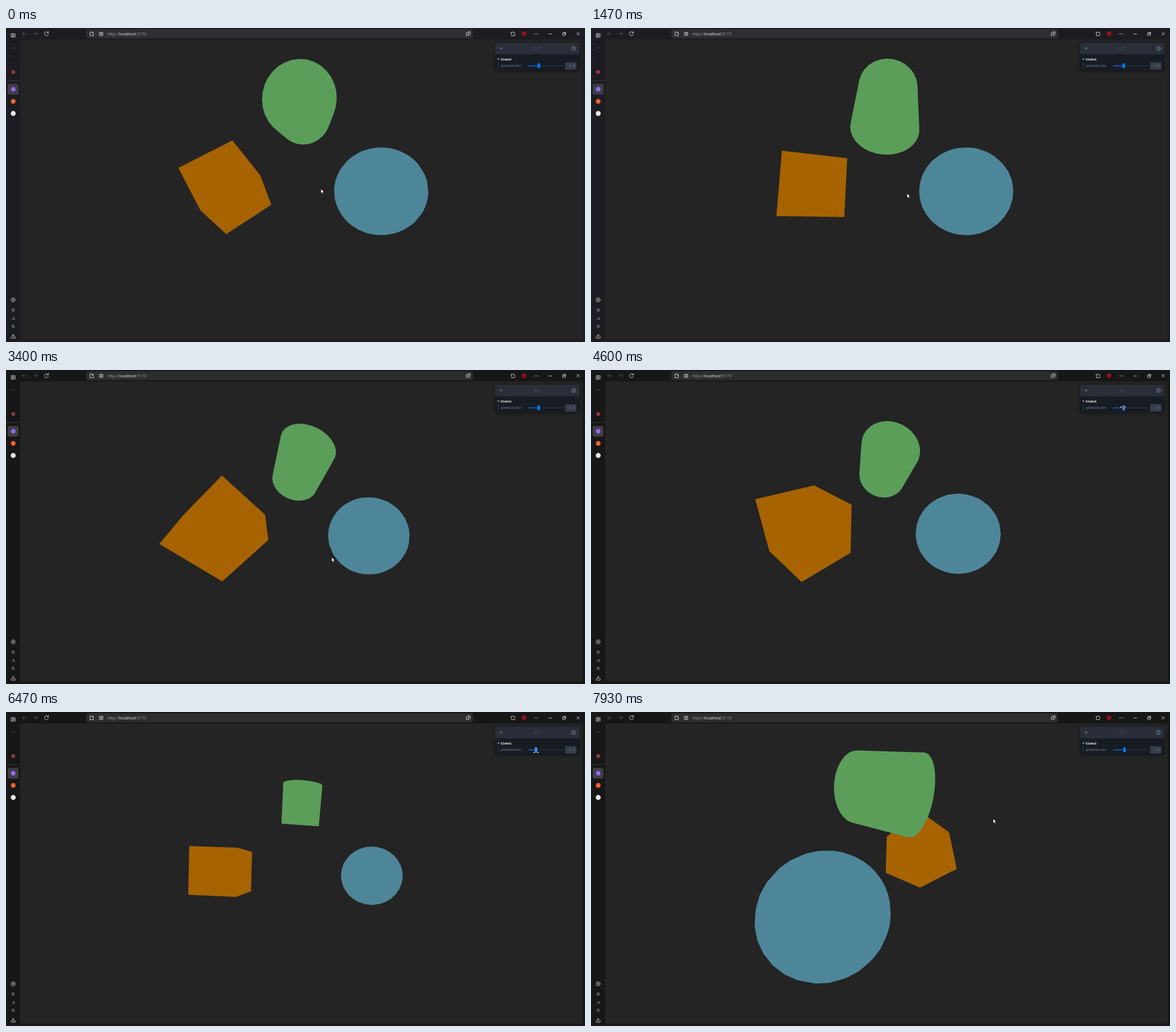
These frames come from a looping animation (1017x551 px, 8000 ms). An HTML page:

```html
<!DOCTYPE html>
<html lang="en">
<head>
<meta charset="utf-8">
<title>Rotating solids</title>
<style>
  html, body { margin: 0; width: 100%; height: 100%; overflow: hidden; background: #181818; }
  svg { display: block; width: 1017px; height: 551px; }
  .line { fill: none; stroke: #d6d6da; stroke-width: .9; stroke-linecap: round; stroke-linejoin: round; }
  .dim { stroke: #5b5b60; }
  .soft { stroke: #96969a; stroke-width: .8; }
  .url { font: 7.1px "Open Sans", "Noto Sans", sans-serif; fill: #a2a2a6; }
  .url tspan { fill: #f2f2f4; }
  .mono { font: 5.3px "Noto Sans Mono", "DejaVu Sans Mono", monospace; fill: #8c92a3; }
  .title { fill: #fefefe; font-weight: 600; }
</style>
</head>
<body>
<svg viewBox="0 0 1017 551">
  <defs>
    <filter id="shadow" x="-10%" y="-20%" width="120%" height="150%">
      <feDropShadow dx="0" dy="1" stdDeviation="3" flood-color="#000" flood-opacity=".45"/>
    </filter>
  </defs>
  <rect id="frame" width="1017" height="551"/>
  <rect x="25" y="20" width="988" height="527" rx="3" fill="#242424"/>
  <g id="scene"></g>

  <!-- toolbar -->
  <rect id="bar" x="141" y="2" width="679" height="16" rx="3"/>
  <path class="line dim" d="M36 10h-7m3-3l-3 3l3 3M48.500 10h7m-3-3l3 3l-3 3"/>
  <path class="line" d="M74 8a3.500 3.500 0 1 0 .5 3M74.500 6v2.500h-2.500"/>
  <path class="line" d="M148 7h3.500l2 2v4.500h-5.500zM151.500 7v2h2"/>
  <path class="line" d="M164.500 7.500h5.500v5.500h-5.500zM166 9.200h2.500M166 11.200h2.500"/>
  <text class="url" x="178" y="13">http://<tspan>localhost</tspan>:5173</text>
  <path class="line" d="M809 8.500h4v5l-2-1.500l-2 1.500zM811 6.700h4.200v5"/>
  <path class="line" d="M887 8h2a1.300 1.300 0 0 1 2.600 0h1.700v2a1.200 1.200 0 0 1 0 2.300v1.200h-5.300v-2a1.100 1.100 0 0 1 0-2z"/>
  <circle cx="910" cy="10" r="4.200" fill="#8d1119"/>
  <path d="M928 9.700h1.200v1.200h-1.200zM930.700 9.700h1.200v1.200h-1.200zM933.400 9.700h1.200v1.200h-1.200z" fill="#ddd"/>
  <path class="line" d="M953.500 10.500h5M978 9h4v4h-4zM979.500 9v-1.500h3.500v4h-1M1002.800 8l4.400 4.400M1007.200 8l-4.400 4.400"/>

  <!-- sidebar -->
  <path class="line" d="M9.500 10h6.500v6h-6.500zM11.500 10v6M14.800 13h-2m1-1l-1 1l1 1"/>
  <path class="line dim" d="M10.500 35h4.500"/>
  <circle id="ghost" cx="12.500" cy="56" r="3.800"/>
  <circle cx="12.700" cy="77.300" r="3.400" fill="#8d3a3c"/>
  <path d="M0 92.500h25" stroke="#34343a"/>
  <rect x="3" y="98" width="19" height="19" rx="3.500" fill="#3d3d43"/>
  <circle cx="12.700" cy="107.500" r="4" fill="#9468f4"/>
  <circle cx="12.700" cy="128.700" r="4.200" fill="#f0622c"/>
  <circle cx="12.700" cy="150" r="4.400" fill="#e6e6e6"/>
  <path class="line" d="M9 477l1.800-3.200h3.700l1.800 3.200l-1.800 3.200h-3.700z"/>
  <circle cx="12.700" cy="477" r="1.200" fill="#ddd"/>
  <path class="line soft" d="M11 493h3.500v2.500h-3.500zM10.500 497h4.500M10.500 511.200h4.500v-2h-3l2-2M11 521.500h3.300v2.200h-3.300zM11.500 525.500h3.500"/>
  <path class="line" d="M12.700 537v4.500m-2-2l2 2l2-2M9.300 541.500v2.700h6.800v-2.700"/>

  <!-- control panel -->
  <g filter="url(#shadow)">
    <rect x="859" y="26" width="148" height="48.500" rx="4" fill="#181c20"/>
    <path d="M859 46v-16a4 4 0 0 1 4-4h140a4 4 0 0 1 4 4v16z" fill="#292d39"/>
  </g>
  <path d="M867 34.500h5.600l-2.800 3.700z" fill="#656b7c"/>
  <path d="M928.500 34.700h9.900M928.500 38.200h9.900" stroke="#6c7285" stroke-width="1.300" stroke-dasharray="1.300 3"/>
  <circle cx="997" cy="36" r="4.200" fill="#535968"/>
  <path d="M995 37.500l3.500-3" stroke="#292d39" stroke-width="1.200"/>
  <path d="M862.500 53.600h4.600l-2.300 3z" fill="#8c92a3"/>
  <text class="mono title" x="869" y="56.800">Global</text>
  <path d="M864.700 60v13" stroke="#373c4b"/>
  <text class="mono" x="869.500" y="68.300">globalScale</text>
  <path d="M917.500 66.500h61" stroke="#373c4b" stroke-width="1.100"/>
  <path id="fill" stroke="#007bff" stroke-width="1.300"/>
  <rect id="knob" y="62" width="4.400" height="8.500" rx="1"/>
  <rect x="982" y="60" width="20" height="13" rx="1.500" fill="#373c4b"/>
  <text id="value" class="mono" x="999" y="68.400" text-anchor="end"></text>

  <g id="cursor" fill="#fff" stroke="#000" stroke-width=".7" stroke-linejoin="round">
    <path id="arrow" d="M0 0v8.300l1.900-1.700l1.300 2.900l1.400-.6l-1.300-2.900h2.600z"/>
    <path id="resize" d="M-5.200 0l2.600-2.300v1.600h5.200v-1.600l2.600 2.300l-2.600 2.300v-1.600h-5.200v1.600z"/>
  </g>
</svg>
<script>
const LOOP = 8000, FPS = 15;
const FOCAL = 343.4, DIST = 5.27, CX = 519, CY = 283.5;
const STEP = 12.25;            // slider pixels per unit of scale
const DRAG = 360 / 527;        // degrees of yaw per dragged pixel
const $ = id => document.getElementById(id);
const { sin, cos, PI, max, min } = Math;
const rad = d => d * PI / 180;

// Pointer moves; those that drag the camera also have a pitch change
const moves = [
  { from: 0, to: 1.47, dx: 2, dy: 8 },
  { from: 1.5, to: 2, dx: -12, dy: 72 },
  { from: 2, to: 2.67, dx: -31, dy: -32, pitch: -18 },
  { from: 2.67, to: 3.4, dx: 60, dy: -1.5, pitch: -13 },
  { from: 3.4, to: 3.7, dx: -9, dy: 6, pitch: 2.5 },
  { from: 3.8, to: 4.3, dx: 371.5, dy: -269.5 },
  { from: 4.6, to: 6.4, dx: 1, dy: 6 },
  { from: 7, to: 7.2, dx: -35, dy: 62 },
  { from: 7.2, to: 7.93, dx: -195.5, dy: 54, pitch: 37.7 }
];

function ease(t, from, to) {
  const k = min(1, max(0, (t - from) / (to - from)));
  return k * k * (3 - 2 * k);
}

function stateAt(t) {
  const scale = 1.5 - ease(t, 4.65, 5.6) + 1.1 * ease(t, 5.75, 7.05);
  const s = { scale, x: 553 + STEP * (scale - 1.5), y: 282, yaw: 4, pitch: 18 };
  for (const m of moves) {
    const k = ease(t, m.from, m.to);
    s.x += m.dx * k;
    s.y += m.dy * k;
    if (m.pitch) {
      s.yaw -= m.dx * DRAG * k;
      s.pitch += m.pitch * k;
    }
  }
  s.spin = 40 + 79.2 * t + 3.3 * max(0, t - 6.5);
  return s;
}

function ring(r, y, n = 32) {
  return Array.from({ length: n }, (_, i) => [r * sin(2 * PI * i / n), y, r * cos(2 * PI * i / n)]);
}
const sides = [-.5, .5];
const cube = sides.flatMap(x => sides.flatMap(y => sides.map(z => [x, y, z])));
const cylinder = sides.flatMap(y => ring(.5, y));
const sphere = Array.from({ length: 17 }, (_, i) => ring(.75 * sin(PI * i / 16), .75 * cos(PI * i / 16))).flat();

const solids = [
  { points: cube, at: [-2, 0, 0], color: "#a66300", rate: [1, 1] },
  { points: cylinder, at: [0, 2, 0], color: "#5a9e5a", rate: [2, 0] },
  { points: sphere, at: [2, 0, 0], color: "#4e8699", rate: [1, 1] }
];
for (const s of solids) {
  s.el = document.createElementNS("http://www.w3.org/2000/svg", "polygon");
  s.el.setAttribute("fill", s.color);
}

// Rotation about y, then x
function turn([x, y, z], ax, ay) {
  const x1 = x * cos(ay) + z * sin(ay), z1 = z * cos(ay) - x * sin(ay);
  return [x1, y * cos(ax) - z1 * sin(ax), y * sin(ax) + z1 * cos(ax)];
}

function hull(points) {
  points.sort((a, b) => a[0] - b[0] || a[1] - b[1]);
  const half = list => {
    const out = [];
    for (const p of list) {
      while (out.length > 1) {
        const [a, b] = out.slice(-2);
        if ((b[0] - a[0]) * (p[1] - a[1]) - (b[1] - a[1]) * (p[0] - a[0]) > 0) break;
        out.pop();
      }
      out.push(p);
    }
    return out.slice(0, -1);
  };
  return [...half(points), ...half(points.slice().reverse())];
}

function drawSolids(state, scale) {
  const spin = rad(state.spin);
  const toView = p => turn(p, rad(state.pitch), -rad(state.yaw));
  for (const s of solids) {
    s.depth = toView(s.at)[2];
    const flat = s.points.map(p => {
      const q = turn(p, spin * s.rate[0], spin * s.rate[1]).map((v, i) => v * scale + s.at[i]);
      const [x, y, z] = toView(q);
      const k = FOCAL / (DIST - z);
      return [CX + x * k, CY - y * k];
    });
    s.el.setAttribute("points", hull(flat).map(p => p.map(v => v.toFixed(2)).join()).join(" "));
  }
  $("scene").append(...solids.slice().sort((a, b) => a.depth - b.depth).map(s => s.el));
}

function drawControls(t, state, scale) {
  const onSlider = t > 4.3 && t < 7.05, x = 917.5 + scale * STEP;
  $("fill").setAttribute("d", `M917.5 66.5H${x}`);
  $("knob").setAttribute("x", x - 2.2);
  $("knob").setAttribute("fill", onSlider ? "#3c93ff" : "#007bff");
  $("value").textContent = scale.toFixed(1);
  $("cursor").setAttribute("transform", `translate(${state.x},${state.y})`);
  $("arrow").style.display = onSlider ? "none" : "";
  $("resize").style.display = onSlider ? "" : "none";
  const tinted = t < 1.9;
  $("frame").setAttribute("fill", tinted ? "#1d1c23" : "#171717");
  $("bar").setAttribute("fill", tinted ? "#2f2f33" : "#2d2d2d");
  $("ghost").setAttribute("fill", tinted ? "#18171d" : "#161616");
}

const start = performance.now();
function frame() {
  const ms = (performance.now() - start) % LOOP;
  const t = Math.floor((ms + 5) * FPS / 1000) / FPS;
  const state = stateAt(t);
  const scale = Math.round(state.scale * 10) / 10;
  drawSolids(state, scale);
  drawControls(t, state, scale);
  requestAnimationFrame(frame);
}
frame();
</script>
</body>
</html>
```
